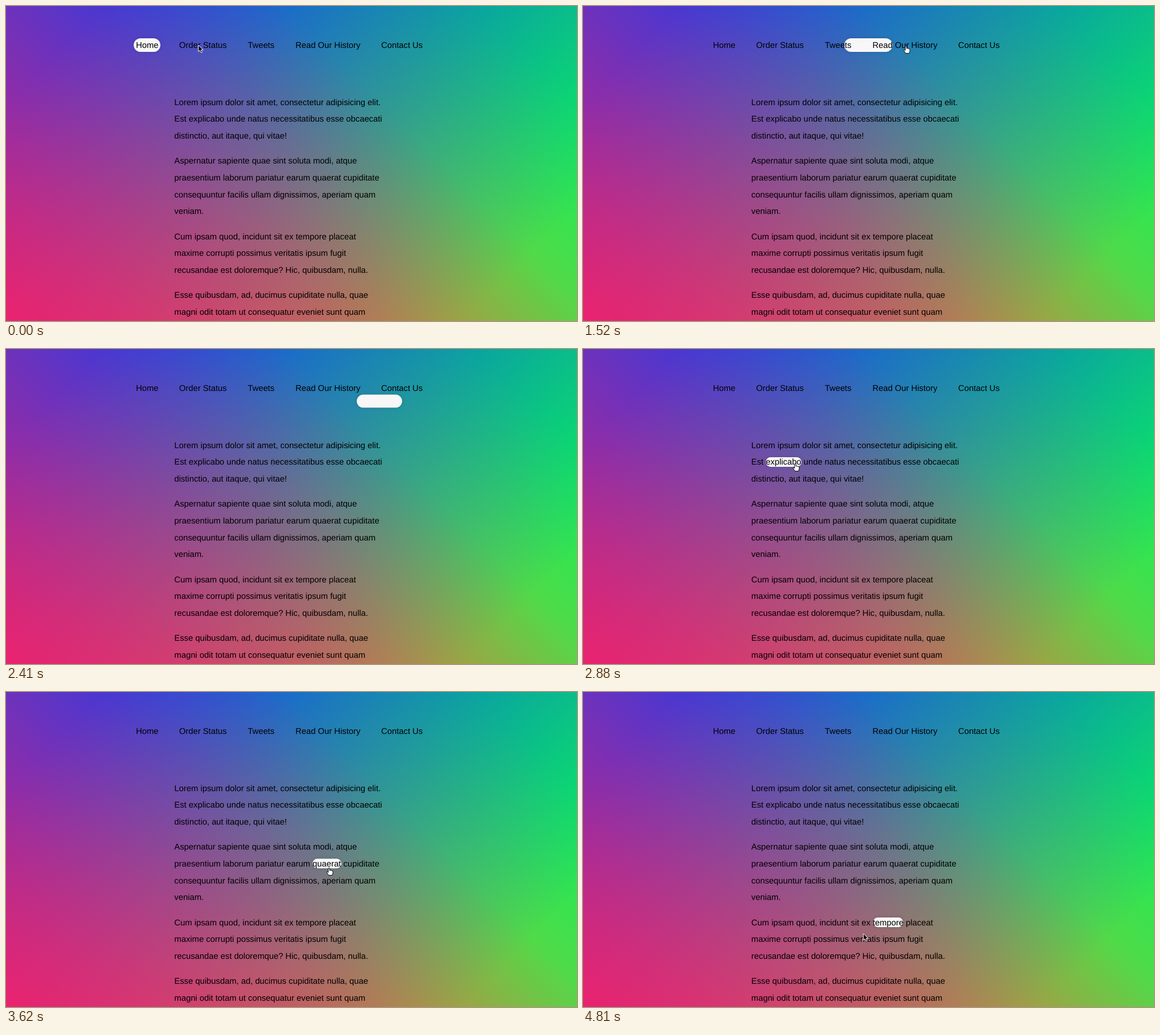
Write an HTML page that moves like this. It is 1006 px wide and 556 px high and loops after 4.91 s.

```html
<!DOCTYPE html>
<html lang="en">
<head>
<meta charset="utf-8">
<title>Follow along links</title>
<style>
  html, body { margin: 0; width: 100%; height: 100%; overflow: hidden; }
  #stage { position: relative; width: 1006px; height: 556px; overflow: hidden; }
  #page {
    position: absolute; inset: 0 0 auto; height: 700px;
    background:
      linear-gradient(45deg, hsla(340, 100%, 55%, 1) 0%, hsla(340, 100%, 55%, 0) 70%),
      linear-gradient(135deg, hsla(225, 95%, 50%, 1) 10%, hsla(225, 95%, 50%, 0) 80%),
      linear-gradient(225deg, hsla(140, 90%, 50%, 1) 10%, hsla(140, 90%, 50%, 0) 80%),
      hsl(35, 95%, 55%);
  }
  #pill {
    position: absolute; left: 0; top: 0;
    border-radius: 15px; background: #f7f7f7;
    box-shadow: 0 0 7px rgba(0, 0, 0, .13);
  }
  svg { position: absolute; left: 0; top: 0; }
  text {
    font: 14.8px "Liberation Sans", Arial, sans-serif;
    text-rendering: geometricPrecision; fill: #000;
  }
  .arrow { fill: #000; stroke: #fff; }
  .hand { fill: #fff; stroke: #000; stroke-linejoin: round; }
  .beam { fill: none; stroke: #454568; opacity: .6; }
</style>
</head>
<body>
<div id="stage">
  <div id="page"></div>
  <div id="pill"></div>
  <svg width="1006" height="556">
    <g id="copy"></g>
    <g id="cursor">
      <path class="arrow" d="M0 0V11.5L2.6 9.2L4.5 13.4L6.6 12.5L4.8 8.4H8.4Z"/>
      <path class="hand" d="M-1.2 1Q0 -.6 1.2 1V5Q2.4 4 3.4 5.2Q4.6 4.4 5.5 5.7Q7 5.2 7 7V9.5L5.7 13.5H-.5L-3.8 8.7Q-4.2 7 -2.6 7.2L-1.2 8.5Z"/>
      <path class="beam" d="M-2.5 -6.5Q0 -6.5 0 -5Q0 -6.5 2.5 -6.5M0 -5V5M-2.5 6.5Q0 6.5 0 5Q0 6.5 2.5 6.5"/>
    </g>
  </svg>
</div>
<script>
const LOOP = 4910, MOVE = 200;
const $ = id => document.getElementById(id);

const nav = [[229, "Home"], [305, "Order Status"], [426, "Tweets"], [510, "Read Our History"], [661, "Contact Us"]];
const paragraphs = [
  ["Lorem ipsum dolor sit amet, consectetur adipisicing elit.",
   "Est explicabo unde natus necessitatibus esse obcaecati",
   "distinctio, aut itaque, qui vitae!"],
  ["Aspernatur sapiente quae sint soluta modi, atque",
   "praesentium laborum pariatur earum quaerat cupiditate",
   "consequuntur facilis ullam dignissimos, aperiam quam",
   "veniam."],
  ["Cum ipsam quod, incidunt sit ex tempore placeat",
   "maxime corrupti possimus veritatis ipsum fugit",
   "recusandae est doloremque? Hic, quibusdam, nulla."],
  ["Esse quibusdam, ad, ducimus cupiditate nulla, quae",
   "magni odit totam ut consequatur eveniet sunt quam"]
];

function addText(x, y, str) {
  const el = document.createElementNS("http://www.w3.org/2000/svg", "text");
  el.setAttribute("x", x);
  el.setAttribute("y", y);
  el.textContent = str;
  $("copy").append(el);
}
for (const [x, label] of nav) addText(x, 74, label);
let y = 174.7;
for (const lines of paragraphs) {
  for (const line of lines) { addText(296.6, y, line); y += 29.6; }
  y += 14.8;
}

// Link boxes: left, top, width, height
const navBox = (x, w) => [x, 57, w, 24.3];
const wordBox = (x, top, w) => [x, top, w, 17];
const links = {
  home: navBox(225, 46.6),
  order: navBox(301.4, 91),
  tweets: navBox(422.4, 54),
  history: navBox(506.2, 122),
  contact: navBox(657.2, 81),
  consectetur: wordBox(483, 161.4, 77.5),
  explicabo: wordBox(322, 191, 63),
  soluta: wordBox(497, 264.7, 39.5),
  quaerat: wordBox(540, 294.3, 50.5),
  tempore: wordBox(511, 398, 53)
};
const hops = [[-MOVE, "home"], [250, "order"], [1000, "tweets"], [1468, "history"], [2020, "contact"],
  [2386, "consectetur"], [2500, "explicabo"], [2960, "soluta"], [3410, "quaerat"], [4310, "tempore"]];

// Pointer: time, x, y, shape from here on
const path = [
  [0, 339, 69, "arrow"], [290, 345, 69, "hand"], [770, 378, 67, "hand"], [940, 433, 66, "hand"],
  [1230, 458, 67, "hand"], [1380, 492, 68, "arrow"], [1520, 569, 70, "hand"],
  [1820, 605, 70, "hand"], [1970, 642, 70, "arrow"], [2110, 682, 69, "hand"],
  [2260, 686, 72, "hand"], [2410, 470, 200, "beam"], [2560, 372, 199, "hand"],
  [2860, 374, 202, "hand"], [3020, 508, 273, "hand"], [3180, 545, 286, "beam"],
  [3330, 566, 296, "hand"], [3620, 569, 310, "hand"], [3770, 567, 327, "beam"],
  [4220, 540, 388, "beam"], [4370, 530, 402, "hand"], [4660, 521, 412, "hand"],
  [4810, 494, 426.5, "arrow"]
];

// The picture is held between these moments
const beats = [0, 290, 450, 610, 770, 940, 1080, 1230, 1380, 1520, 1670, 1820, 1970, 2110, 2260, 2410,
  2560, 2710, 2860, 3020, 3180, 3330, 3480, 3620, 3770, 3920, 4070, 4220, 4370, 4510, 4660, 4810];

const lastIndex = (list, t) => list.findLastIndex(item => item[0] <= t);
const mix = (a, b, p) => a + (b - a) * p;
const easeOut = x => 1 - (1 - x) ** 2;

function drawPill(t) {
  const i = lastIndex(hops, t), [start, name] = hops[i];
  const to = links[name], from = links[hops[Math.max(0, i - 1)][1]];
  const p = easeOut(Math.min(1, (t - start) / MOVE));
  const [x, top, w, h] = to.map((v, k) => mix(from[k], v, p));
  const s = $("pill").style;
  s.transform = `translate(${x}px, ${top}px)`;
  s.width = w + "px";
  s.height = h + "px";
}

function drawCursor(t) {
  const i = lastIndex(path, t), a = path[i], b = path[i + 1] || a;
  const p = b === a ? 0 : (t - a[0]) / (b[0] - a[0]);
  $("cursor").setAttribute("transform", `translate(${mix(a[1], b[1], p)} ${mix(a[2], b[2], p)})`);
  for (const shape of $("cursor").children)
    shape.style.display = shape.classList.contains(a[3]) ? "" : "none";
}

function render(now) {
  const t = now % LOOP, beat = beats.findLast(b => b <= t);
  drawPill(beat);
  drawCursor(beat);
}

let origin;
function frame(now) {
  origin ??= now;
  render(Math.max(0, now - origin));
  requestAnimationFrame(frame);
}
render(0);
requestAnimationFrame(frame);
</script>
</body>
</html>
```
